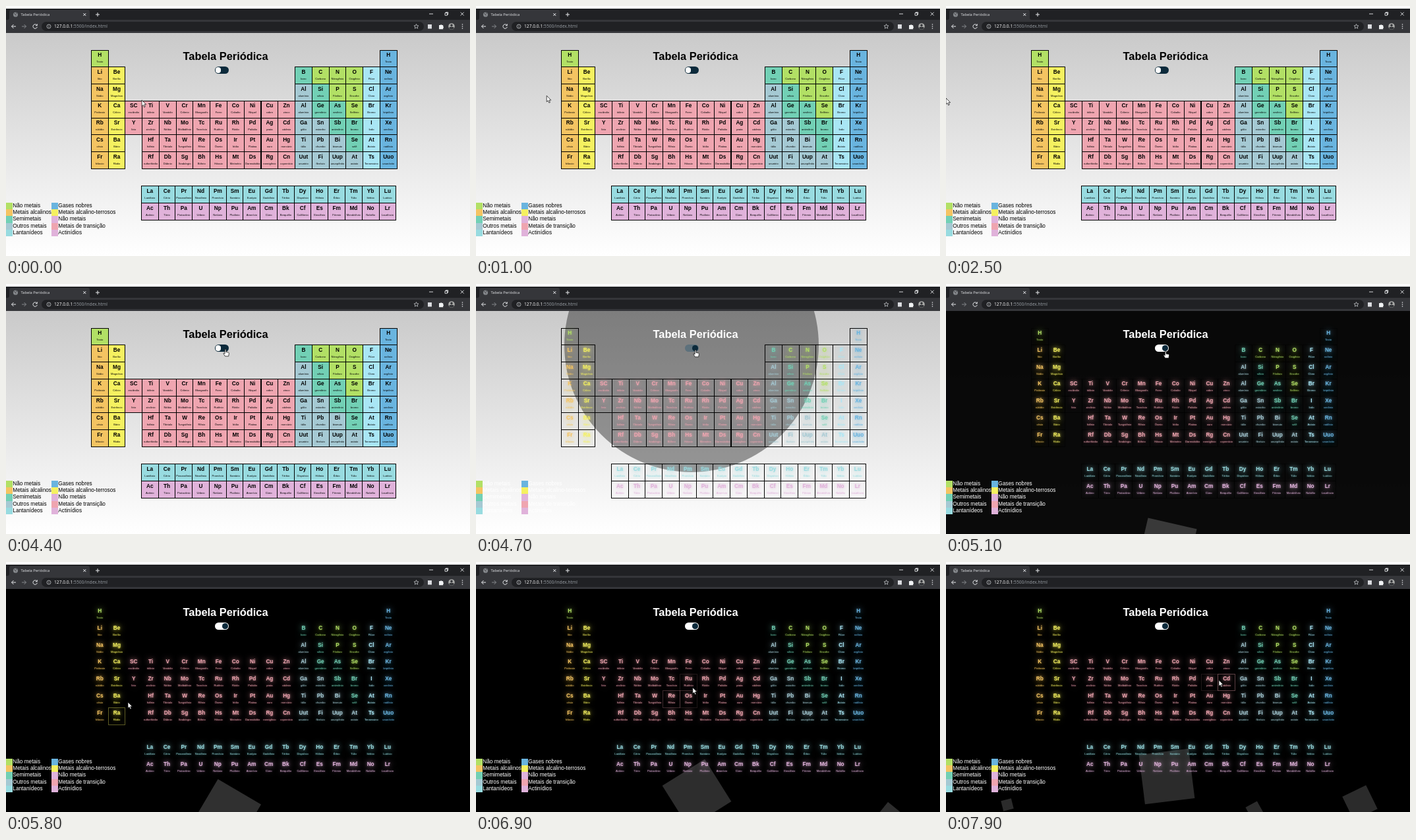
An HTML page that plays this animation: 704x380 px, repeating every 8000 ms.

```html
<!DOCTYPE html>
<html lang="pt">
<head>
<meta charset="utf-8">
<title>Tabela Periódica</title>
<style>
  html, body { margin: 0; width: 100%; height: 100%; overflow: hidden; background: #fff; }
  #stage { position: relative; width: 704px; height: 380px; overflow: hidden; font-family: "Liberation Sans", Arial, sans-serif; }
  #stage > * { position: absolute; }
  #page { left: 0; top: 41px; width: 704px; height: 339px; overflow: hidden; background: linear-gradient(#cacaca, #fff); }
  #night { position: absolute; inset: 0; background: #000; }
  .square { position: absolute; background: #fff; }
  #title { left: 233px; top: 66px; width: 200px; text-align: center; font: bold 16.4px/20px "Liberation Sans", Arial, sans-serif; }
  #pill { left: 316.5px; top: 92.3px; width: 21px; height: 10.5px; border-radius: 6px; }
  #knob { position: absolute; top: 1px; width: 8.5px; height: 8.5px; border-radius: 50%; }
  .cell { width: 26.76px; height: 26.76px; box-sizing: border-box; border: 1px solid #000; text-align: center; white-space: nowrap; }
  .cell b { display: block; margin: 2.6px -5px 0; font-size: 8.25px; line-height: 10px; }
  .cell span { display: block; margin: 1.9px -5px 0; font-size: 4.13px; line-height: 5px; }
  .key { height: 10.3px; padding-left: 10.3px; font-size: 8.25px; line-height: 10.3px; white-space: nowrap; }
  .key i { position: absolute; left: 0; top: 0; width: 10.3px; height: 10.4px; }
  svg { left: 0; top: 0; overflow: visible; }
  svg text { font-family: "Open Sans", "Noto Sans", sans-serif; }
</style>
</head>
<body>
<div id="stage">
  <div id="page"><div id="night"></div></div>
  <div id="title">Tabela Periódica</div>
  <div id="pill"><div id="knob"></div></div>

  <svg id="browser" width="704" height="41" fill="none" stroke="#e8eaed">
    <g stroke="none">
      <rect width="704" height="4" fill="#fff"/>
      <rect y="4" width="704" height="17" fill="#202124"/>
      <path d="M2 21q3 0 3-3V9q0-3 3-3H124q3 0 3 3v9q0 3 3 3z" fill="#35363a"/>
      <rect y="21" width="704" height="20" fill="#35363a"/>
      <rect x="54" y="24" width="580" height="14" rx="7" fill="#202124"/>
      <circle cx="14.5" cy="13" r="3.6" fill="#85888c"/>
      <path d="M12 11.5l2.5 1 .5 2M15 10l2 2" stroke="#45464a"/>
      <text x="22.5" y="15.2" font-size="5.75" fill="#e8eaed">Tabela Periódica</text>
      <text x="73" y="33.4" font-size="6.7" fill="#fff">127.0.0.1<tspan fill="#9aa0a6">:5500/index.html</tspan></text>
      <rect x="640" y="28" width="6" height="6.5" fill="#dadce0"/>
      <path d="M657 29h2a1.3 1.3 0 0 1 2.4 0h1.8v2a1.3 1.3 0 0 1 0 2.4v1.8H657z" fill="#f1f3f4"/>
      <circle cx="676" cy="31" r="4.8" fill="#a9aaa8"/>
      <path d="M672 33.5a4.2 3 0 0 1 8 0a4.8 4.8 0 0 1-8 0z" fill="#303236"/>
      <circle cx="676" cy="29.3" r="1.7" fill="#303236"/>
      <g fill="#e8eaed"><circle cx="692.5" cy="28" r=".8"/><circle cx="692.5" cy="31" r=".8"/><circle cx="692.5" cy="34" r=".8"/></g>
    </g>
    <path d="M117.3 11l4 4m0-4l-4 4M136 13h6M139 10v6"/>
    <path d="M642 12h6M666 10.700h3.500v3.500H666zM667.200 10.500V9.500h3.500V13h-1M689.7 9.5l5 5m0-5l-5 5" stroke-width=".9"/>
    <path d="M15 31H8.5M11.5 28l-3 3 3 3"/>
    <path d="M24 31h6.5M27.5 28l3 3-3 3" stroke="#85888c"/>
    <path d="M46.8 29.2a3.2 3.2 0 1 0 .5 2.6M47.3 27.3v2.4H45"/>
    <g stroke="#c4c7cb" stroke-width=".8">
      <circle cx="65" cy="31" r="3"/><path d="M65 30.4v2.3M65 29v.7"/>
      <path d="M622.5 27.5l1 2.3 2.5.2-1.9 1.7.6 2.4-2.2-1.3-2.2 1.3.6-2.4-1.9-1.7 2.5-.2z"/>
    </g>
  </svg>

  <svg id="cursor" width="12" height="14" stroke="#000" stroke-width=".7" fill="#fff" stroke-linejoin="round">
    <path id="arrow" d="M0 0v9.3l2.1-1.9 1.5 3.4 1.6-.7-1.5-3.3h2.9z"/>
    <path id="hand" d="M-.9.6q.9-1.2 1.8 0v3.7l3.6.7q1 .3.9 1.4l-.7 4.4H-.6L-3 6.9q-.3-1.2 1-.9l1.1.9z"/>
  </svg>
</div>

<script>
const LOOP = 8000, STEP = 100;
const PITCH = 25.76, LEFT = 128.9, TOP = 66.6;
const COLORS = {
  n: "#b2e065", a: "#f4c462", e: "#f5f160", t: "#efa5b0", s: "#72d0b5",
  o: "#a5c9d3", h: "#a9e6f5", g: "#69b4df", l: "#98dbe0", c: "#e0b2da"
};
// Each run: row, first column, one colour code per cell, symbol:name pairs.
const RUNS = [
  [0, 0, "n", "H:Texto"],
  [0, 17, "g", "H:Texto"],
  [1, 0, "ae", "Li:lítio Be:Berílio"],
  [1, 12, "snnnhg", "B:boro C:Carbono N:Nitrogênio O:Oxigênio F:Flúor Ne:neônio"],
  [2, 0, "ae", "Na:Sódio Mg:Magnésio"],
  [2, 12, "osnnhg", "Al:alumínio Si:silício P:Fósforo S:Enxofre Cl:Cloro Ar:argônio"],
  [3, 0, "aettttttttttossnhg", "K:Potássio Ca:Cálcio SC:escândio Ti:titânio V:Vanádio Cr:Crômio Mn:Manganês Fe:Ferro Co:Cobalto Ni:Níquel Cu:cobre Zn:zinco Al:alumínio Ge:germânio As:arsênio Se:Selênio Br:Bromo Kr:kriptônio"],
  [4, 0, "aettttttttttoosshg", "Rb:rubídio Sr:Estrôncio Y:Ítrio Zr:zircônio Nb:Nióbio Mo:Molibdênio Tc:Tecnécio Ru:Rutênio Rh:Ródio Pd:Paládio Ag:prata Cd:cádmio Ga:gálio Sn:estanho Sb:antimônio Br:bromo I:Iodo Xe:xenônio"],
  [5, 0, "ae", "Cs:césio Ba:Bário"],
  [5, 3, "tttttttttoooshg", "Hf:háfnio Ta:Tântalo W:Tungstênio Re:Rênio Os:Ósmio Ir:Irídio Pt:Platina Au:ouro Hg:mercúrio Ti:tálio Pb:chumbo Bi:bismuto Se:selê At:Astato Rn:radônio"],
  [6, 0, "ae", "Fr:frâncio Ra:Rádio"],
  [6, 3, "tttttttttoooohg", "Rf:rutherfórdio Db:Dúbnio Sg:Seabórgio Bh:Bóhrio Hs:Hássio Mt:Meitnério Ds:Darmstádtio Rg:roentgênio Cn:copernício Uut:ununtrio Fi:fleróvio Uup:ununpêntio At:astato Ts:Tennessino Uuo:ununóctio"],
  [8.03, 2.95, "l".repeat(15), "La:Lantânio Ce:Cério Pr:Praseodímio Nd:Neodímio Pm:Promécio Sm:Samário Eu:Európio Gd:Gadolínio Tb:Térbio Dy:Disprósio Ho:Hólmio Er:Érbio Tm:Túlio Yb:Itérbio Lu:Lutécio"],
  [9.03, 2.95, "c".repeat(15), "Ac:Actínio Th:Tório Pa:Protactínio U:Urânio Np:Netúnio Pu:Plutônio Am:Amerício Cm:Cúrio Bk:Berquélio Cf:Califórnio Es:Einstênio Fm:Férmio Md:Mendelévio No:Nobélio Lr:Laurêncio"]
];
const KEYS = [
  ["n", "Não metais", "g", "Gases nobres"],
  ["a", "Metais alcalinos", "e", "Metais alcalino-terrosos"],
  ["s", "Semimetais", "c", "Não metais"],
  ["o", "Outros metais", "t", "Metais de transição"],
  ["l", "Lantanídeos", "c", "Actinídios"]
];
// Tables of [time, values...]
const PATH = [
  [0, 206, 143], [900, 120, 136], [1800, 5, 139], [2500, 0, 140], [2800, 0, 140],
  [3300, 11, 141], [3500, 11, 141], [4200, 331, 98], [4400, 333, 99], [4700, 333, 100],
  [4900, 333.5, 101.5], [5200, 333, 102], [5500, 168, 238], [5700, 172, 232], [5800, 185, 213],
  [6200, 230, 190], [6700, 300, 208], [7200, 372, 165], [7700, 416, 182], [7900, 414, 179.5]
];
const NIGHT = [ // radius, opacity
  [4500, 0, .2], [4600, 62, .25], [4700, 193, .38], [4800, 420, .62],
  [4900, 720, .83], [5000, 800, .92], [5200, 800, 1]
];
// x, y, side and angle at 7900 ms
const SQUARES = [[335, 325.6, 76, 83], [93, 368.5, 16, 76], [468, 376.5, 20, 61], [627.5, 366, 40, 64]];
const RISE = 26.8, SPIN = 25;

const $ = id => document.getElementById(id);
const stage = $("stage"), page = $("page");
const clamp = v => Math.max(0, Math.min(1, v));

function add(parent, className, style, html = "") {
  const el = document.createElement("div");
  el.className = className;
  el.innerHTML = html;
  Object.assign(el.style, style);
  parent.append(el);
  return el;
}

function sample(table, t) {
  if (t <= table[0][0]) return table[0].slice(1);
  const i = table.findIndex(row => row[0] >= t);
  if (i < 0) return table[table.length - 1].slice(1);
  const a = table[i - 1], b = table[i], k = (t - a[0]) / (b[0] - a[0]);
  return a.slice(1).map((v, j) => v + (b[j + 1] - v) * k);
}

function mix(from, to, k, alpha = 1) {
  const part = (hex, i) => parseInt(hex.slice(1 + 2 * i, 3 + 2 * i), 16);
  const rgb = [0, 1, 2].map(i => Math.round(part(from, i) + (part(to, i) - part(from, i)) * k));
  return `rgba(${rgb},${alpha})`;
}
const fade = (color, alpha) => mix(color, color, 0, alpha);

const cells = [];
for (const [row, col, codes, list] of RUNS) {
  list.split(" ").forEach((item, i) => {
    const [symbol, name] = item.split(":");
    const x = LEFT + (col + i) * PITCH, y = TOP + row * PITCH;
    const el = add(stage, "cell", { left: x + "px", top: y + "px" }, `<b>${symbol}</b><span>${name}</span>`);
    cells.push({ el, x, y, color: COLORS[codes[i]] });
  });
}

const keys = KEYS.flatMap((row, r) => [0, 1].map(c =>
  add(stage, "key", { left: c * 69 + "px", top: 298.6 + r * 10.3 + "px" },
    `<i style="background:${COLORS[row[c * 2]]}"></i>${row[c * 2 + 1]}`)));

const squares = SQUARES.map(([x, y, side, angle]) => ({
  y, side, angle,
  el: add(page, "square", { left: x - side / 2 + "px", width: side + "px", height: side + "px" })
}));
stage.append($("browser"), $("cursor"));

function inCell(cell, [x, y]) {
  return x >= cell.x && x < cell.x + PITCH && y >= cell.y && y < cell.y + PITCH;
}

function draw(t) {
  const dark = clamp((t - 4550) / 130), slow = clamp((t - 4550) / 450);
  const frame = 1 - clamp((t - 4900) / 400);
  const text = mix("#000000", "#ffffff", dark);

  const [radius, alpha] = sample(NIGHT, t);
  $("night").style.clipPath = `circle(${radius}px at 327px 52px)`;
  $("night").style.opacity = alpha;

  const ago = (7900 - t) / 1000;
  for (const s of squares) {
    s.el.style.top = s.y + RISE * ago - 41 - s.side / 2 + "px";
    s.el.style.transform = `rotate(${s.angle - SPIN * ago}deg)`;
    s.el.style.opacity = t < 4600 ? 0 : .17 + .008 * ago;
  }

  $("title").style.color = text;
  for (const key of keys) key.style.color = text;
  $("pill").style.background = mix("#0c2a3b", "#ffffff", slow);
  $("knob").style.background = mix("#ffffff", "#0c2a3b", dark);
  $("knob").style.left = 1 + 10.5 * dark + "px";

  const trail = [0, 100, 200, 300].map(back => sample(PATH, t - back));
  for (const cell of cells) {
    const { el, color } = cell;
    const hover = dark * trail.filter(p => inCell(cell, p)).length / 4;
    el.style.background = fade(color, 1 - dark);
    el.style.color = mix("#000000", color, dark);
    el.style.textShadow = dark ? `0 0 3px ${fade(color, .6 * dark)}, 0 0 10px ${fade(color, dark)}` : "none";
    el.style.borderColor = hover ? fade(color, hover * .5) : fade("#000000", frame);
    el.style.zIndex = hover ? 1 : 0;
  }

  const [x, y] = trail[0];
  const onToggle = x > 317 && x < 338 && y > 92 && y < 103;
  $("cursor").style.transform = `translate(${x}px,${y}px)`;
  $("cursor").style.zIndex = 2;
  $("hand").style.display = onToggle ? "" : "none";
  $("arrow").style.display = onToggle ? "none" : "";
}

const start = performance.now();
let last = -1;
function tick() {
  const t = Math.floor(((performance.now() - start) % LOOP) / STEP) * STEP;
  if (t !== last) draw(last = t);
  requestAnimationFrame(tick);
}
tick();
</script>
</body>
</html>
```
